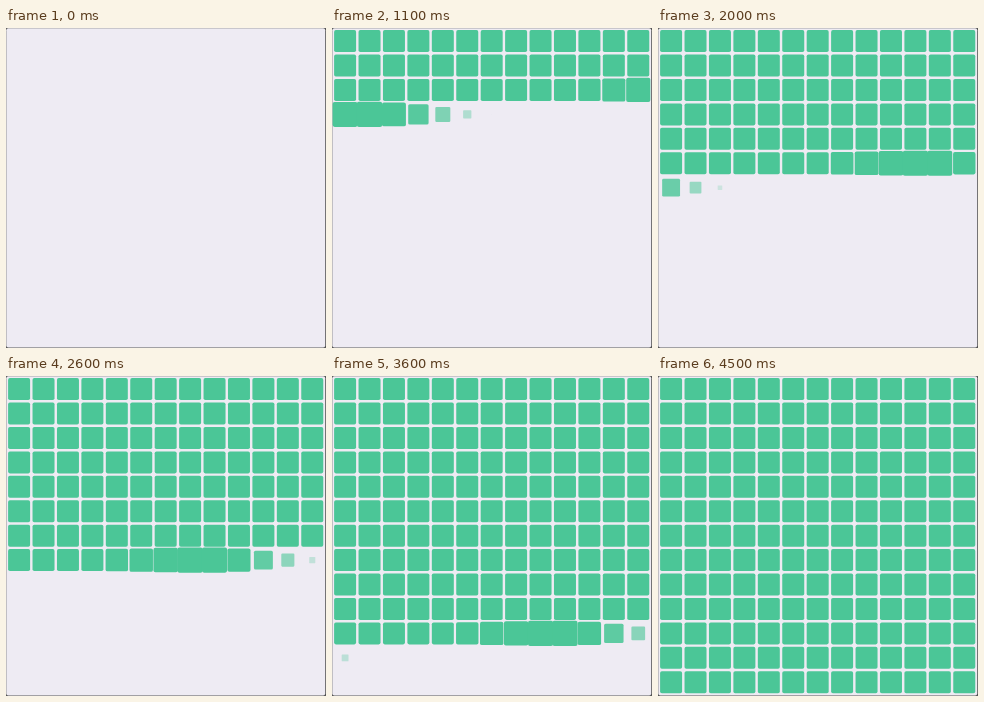
An HTML page with a canvas for the animation above (4600 ms loop, 320x320 px).

```html
<!DOCTYPE html>
<html lang="en">
<head>
<meta charset="utf-8">
<title>Tile grid</title>
<style>
html, body { margin: 0; width: 100%; height: 100%; overflow: hidden; }
canvas { display: block; }
</style>
</head>
<body>
<canvas id="stage" width="320" height="320"></canvas>
<script>
const ctx = document.getElementById('stage').getContext('2d');
const LOOP = 4600, STEP = 100;
const COLS = 13, PITCH = 24.43, FIRST = 13.1;
const SIZE = 22, PEAK = 25.3, RISE = 5.2, SETTLE = 10;

// The wave's pace varies slightly: [ms, tiles started]
const pace = [[0, 0], [500, 19.1], [1100, 45.1], [2000, 80.6],
  [2600, 103.8], [3600, 143.9], [4500, 180], [LOOP, 184]];

function waveAt(t) {
  const i = pace.findIndex(p => p[0] > t);
  const [t0, a] = pace[i - 1], [t1, b] = pace[i];
  return a + (b - a) * (t - t0) / (t1 - t0);
}

// Pop up past full size, then ease back
function sizeAt(age) {
  if (age < RISE) return PEAK * Math.sin(Math.PI / 2 * age / RISE);
  const k = Math.min(1, (age - RISE) / (SETTLE - RISE));
  return SIZE + (PEAK - SIZE) * (1 + Math.cos(Math.PI * k)) / 2;
}

function box(x, y, w, h, r, color) {
  ctx.fillStyle = color;
  ctx.beginPath();
  ctx.roundRect(x, y, w, h, r);
  ctx.fill();
}

function draw(t) {
  ctx.globalAlpha = 1;
  box(0, 0, 320, 320, 0, '#555');
  box(0.3, 0.3, 318.9, 319.3, 2, '#eeebf3');
  const wave = waveAt(t);
  for (let i = 0; i < COLS * COLS && i < wave; i++) {
    const s = sizeAt(wave - i);
    const x = FIRST + i % COLS * PITCH;
    const y = FIRST + Math.floor(i / COLS) * PITCH;
    ctx.globalAlpha = Math.min(1, s / SIZE);
    box(x - s / 2, y - s / 2, s, s, 1.8 * s / SIZE, '#4bc697');
  }
}

const start = performance.now();
function tick() {
  const t = (performance.now() - start) % LOOP;
  draw(Math.floor(t / STEP) * STEP);
  requestAnimationFrame(tick);
}
tick();
</script>
</body>
</html>
```
